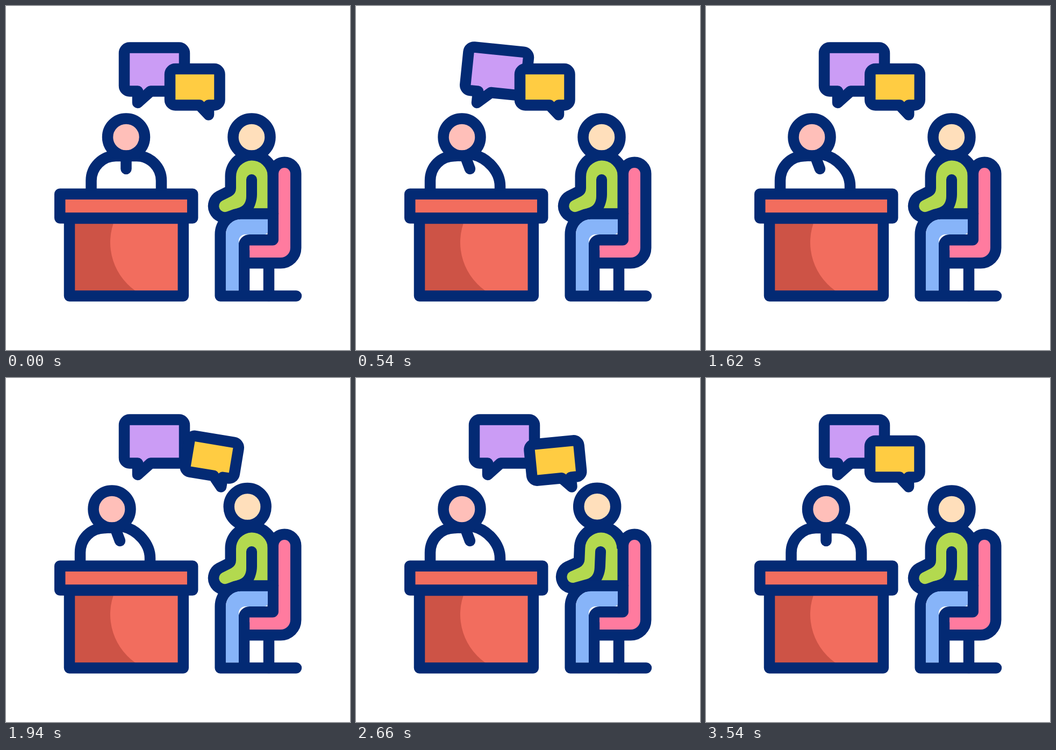
An HTML page that plays this animation: 640 px wide and 640 px high, repeating every 3.6 s.

```html
<!DOCTYPE html>
<html lang="en">
<head>
<meta charset="utf-8">
<title>Interview</title>
<style>
  html, body { margin: 0; width: 100%; height: 100%; overflow: hidden; background: #fff; }
  svg { display: block; width: 100vw; height: 100vh; }
  .line { fill: none; stroke: #032a74; stroke-width: 20.5; stroke-linejoin: round; stroke-linecap: round; }
  .halo { fill: #032a74; stroke: #032a74; stroke-width: 41; stroke-linejoin: round; }
</style>
</head>
<body>
<svg viewBox="0 0 640 640">
  <defs>
    <path id="seat" d="M507 312a11 11 0 0 1 22 0V450a18 18 0 0 1-18 18H453V445.500H496a11 11 0 0 0 11-11Z"/>
    <path id="shirt" d="M428 318A29.500 29.500 0 0 1 487 316L496 322V390H452Q467 371 467 350V323A10 10 0 0 0 447 323V354Q447 370 434 375L411 382.500A11 11 0 0 1 402 362.500L419 354Q428 349 428 339Z"/>
  </defs>

  <!-- speech bubbles -->
  <path id="purple" class="line" style="fill:#cb9cf5" d="M230 77.500H322a10 10 0 0 1 10 10V148.500a10 10 0 0 1-10 10H269L245 180V158.500H230a10 10 0 0 1-10-10V87.500a10 10 0 0 1 10-10Z"/>
  <path id="yellow" class="line" style="fill:#ffcc42" d="M315 117H387.500a10 10 0 0 1 10 10V174.500a10 10 0 0 1-10 10H377V202.500L360 184.500H315a10 10 0 0 1-10-10V127a10 10 0 0 1 10-10Z"/>

  <!-- interviewer -->
  <path id="coat" class="line" style="fill:#fff"/>
  <path id="tie" class="line"/>
  <circle id="headL" class="line" style="fill:#ffbfb9" cx="223.500" cy="244" r="34.500"/>

  <!-- desk -->
  <path fill="#f26d5e" d="M118 395H330V539.500H118Z"/>
  <path fill="#cd5346" d="M118 395H203.500A109.800 109.800 0 0 0 249 535V539.500H118Z"/>
  <path class="line" d="M118 395H329.800V539.500H118Z"/>
  <path class="line" style="fill:#f26d5e" d="M100.200 349.800H347.200V394.500H100.200Z"/>

  <!-- candidate -->
  <g id="body">
    <use href="#shirt" class="halo"/>
  </g>
  <circle id="headR" class="line" style="fill:#ffdfbb" cx="457" cy="244" r="34.500"/>
  <g id="arm">
    <use href="#shirt" fill="#b3d94f"/>
  </g>

  <!-- chair and legs -->
  <path class="line" d="M489 488V539"/>
  <use href="#seat" class="halo"/>
  <use href="#seat" fill="#ff7b9f"/>
  <path class="line" d="M497 386.500H437A38.500 38.500 0 0 0 398.700 425V539.500H540M443 539.500V455"/>
  <path fill="#87b4f9" d="M409 529.300V425A28 28 0 0 1 437 396.700H487V419a6 6 0 0 1-6 6H445a12 12 0 0 0-12 12V529.300Z"/>
</svg>
<script>
  const LOOP = 3600;
  const el = id => document.getElementById(id);
  const set = (id, name, value) => el(id).setAttribute(name, value);
  const mix = (a, b, k) => a + (b - a) * k;

  // Eased value between [time, value] keys
  function track(keys, t) {
    if (t <= keys[0][0]) return keys[0][1];
    for (let i = 1; i < keys.length; i++) {
      const [t0, a] = keys[i - 1], [t1, b] = keys[i];
      if (t < t1) {
        const s = (t - t0) / (t1 - t0);
        return mix(a, b, s * s * (3 - 2 * s));
      }
    }
    return keys[keys.length - 1][1];
  }

  const hold = (from, to) => [[from, 0], [from + 400, 1], [to, 1], [to + 400, 0]];

  // Swing to and fro every 200 ms, then settle
  function rock(from, to, angle) {
    const keys = [[from, 0]];
    for (let t = from + 400; t <= to; t += 200, angle = -angle) keys.push([t, angle]);
    keys.push([to + 400, 0]);
    return keys;
  }

  const purpleMove = hold(0, 1200), purpleRock = rock(0, 1200, -10);
  const yellowMove = hold(1600, 3000), yellowRock = rock(1600, 3000, 10);
  const leanLeft = hold(0, 3000), leanRight = hold(1600, 3000);

  const coatPath = p =>
    `M${p[0]} 345V325C${p[0]} 299.600 ${p[1]} 279 ${p[2]} 279L${p[3]} ${p[4]}` +
    `C${p[5]} ${p[6]} ${p[7]} ${p[8]} ${p[7]} ${p[9]}V345`;
  const coatUp = [158.5, 179, 204.5, 243, 279, 268.4, 279, 289, 299.6, 325];
  const coatLean = [138, 157, 184, 217, 276, 246, 283, 268, 309, 335];

  function draw(t) {
    const yellowTurn = track(yellowRock, t);
    set('purple', 'transform',
      `translate(${-20 * track(purpleMove, t)} 0) rotate(${track(purpleRock, t)} 245 180)`);
    set('yellow', 'transform',
      `translate(${24.5 * track(yellowMove, t)} 0) rotate(${yellowTurn} 377 202.5)`);

    const l = track(leanLeft, t);
    set('coat', 'd', coatPath(coatUp.map((v, i) => mix(v, coatLean[i], l))));
    set('tie', 'd', `M${mix(223.5, 203, l)} 279L${mix(223.5, 212, l)} 303`);
    set('headL', 'transform', `translate(${-26.5 * l} 0)`);

    const r = track(leanRight, t);
    const turn = `rotate(${1.5 * r - 0.15 * yellowTurn} 457 275)`;
    set('body', 'transform', turn);
    set('arm', 'transform', turn);
    set('headR', 'transform', `translate(${-8.3 * r} ${-4.8 * r})`);
  }

  const start = performance.now();
  function tick() {
    draw((performance.now() - start) % LOOP);
    requestAnimationFrame(tick);
  }
  draw(0);
  requestAnimationFrame(tick);
</script>
</body>
</html>
```
